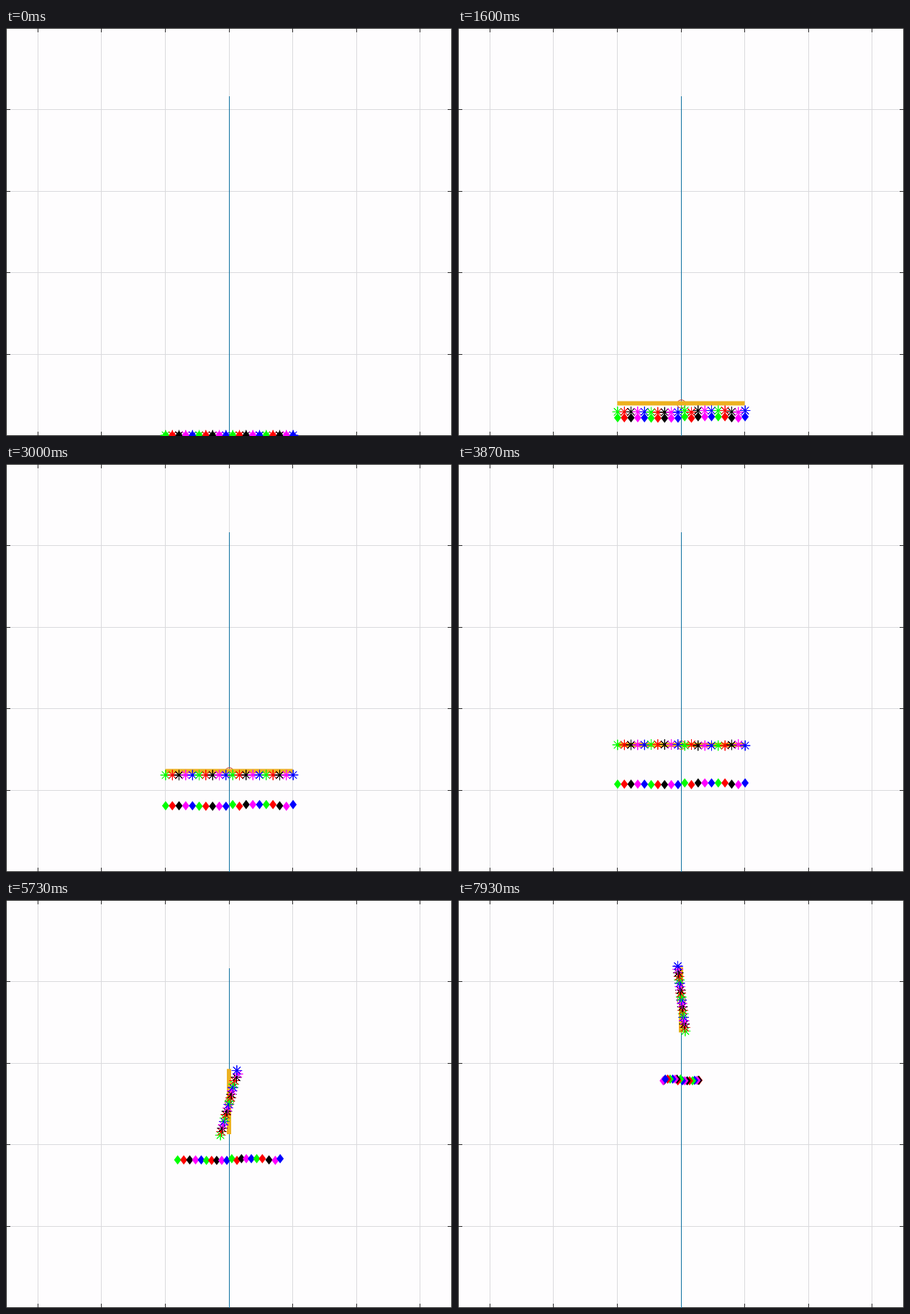
Write a matplotlib script that moves like this. It is 620 by 568 pixels and loops after 8000 ms.

```python
import numpy as np
import matplotlib.pyplot as plt
from matplotlib.animation import FuncAnimation
from matplotlib.path import Path

W, H, DPI = 620, 568, 100
PX = 72 / DPI                    # points per pixel
FRAMES, STEPS = 120, 109
CX, RX, RY = 310, 88.6, 45.4     # centre line, formation half-lengths in pixels
N = 20
idx = np.arange(N)
home = np.linspace(-1, 1, N)
colors = [("lime", "red", "black", "magenta", "blue")[i % 5] for i in idx]

# Three groups of agents respond with different damping
quick = np.isin(idx, [10, 12, 13, 14, 15, 16, 19])
lazy = np.isin(idx, [5, 6, 7, 8, 9, 11, 18])
damping = np.select([quick, lazy], [0.175, 0.135], 0.145)[:, None]

plt.rcParams["path.snap"] = False


def bar_pose(s):
    """Height and angle of the reference bar: speed up, climb, turn upright."""
    y = np.interp(s, [0, 10, 19, 40, 49, 64, 87, 108],
                  [567, 553, 522.5, 427.5, 391, 328, 219, 135])
    return np.array([y, np.clip(4.2 * (s - 52), 0, 90)])


def on_bar(u, y, angle):
    a = np.radians(angle)
    return np.column_stack([CX + RX * u * np.cos(a), y - RY * u * np.sin(a)])


def simulate():
    """Stars track the bar as damped springs; diamonds chase the bar's height
    and their star's x with a bounded pull."""
    gain, limit, drag = np.array([[.0155, .1], [.3, .47], [.08, .14]])
    pose, turn = np.tile(bar_pose(0), (N, 1)), np.zeros((N, 2))
    dia, vel = on_bar(home, *pose.T), np.zeros((N, 2))
    stars, diamonds = [], []
    for s in range(STEPS):
        star = on_bar(home, *pose.T)
        stars.append(star)
        diamonds.append(dia)
        goal = np.column_stack([star[:, 0], pose[:, 0]])
        vel = vel + np.clip(gain * (goal - dia), -limit, limit) - drag * vel
        dia = dia + vel
        now, ahead = bar_pose(s), bar_pose(s + 1)
        turn = turn + 0.01 * (now - pose) + damping * (ahead - now - turn)
        pose = pose + turn
    return stars, diamonds


def step_of(n):
    """Simulation step of a picture: it waits at the start and before turning."""
    return min(max(n - 5, 0), 48) if n < 58 else max(n - 11, 49)


stars, diamonds = simulate()

fig = plt.figure(figsize=(W / DPI, H / DPI), dpi=DPI, facecolor="#fefdfe")
ax = fig.add_axes([0, 0, 1, 1])
ax.set_xlim(0, W)
ax.set_ylim(H, 0)
ax.axis("off")

# Grid, ticks and frame
gx = np.floor(CX + RX * np.arange(-3, 4)) + 0.5
gy = np.floor(113.5 * np.arange(1, 5)) + 0.5
ax.vlines(gx, 0, H, color="#dadadd", lw=PX, zorder=0)
ax.hlines(gy, 0, W, color="#dadadd", lw=PX, zorder=0)
for a, b in ((0, 6), (H - 6, H)):
    ax.vlines(gx, a, b, color="#262626", lw=PX, zorder=1)
for a, b in ((0, 6), (W - 6, W)):
    ax.hlines(gy, a, b, color="#262626", lw=PX, zorder=1)
ax.plot([.5, W - .5, W - .5, .5, .5], [.5, .5, H - .5, H - .5, .5],
        color="#262626", lw=PX, zorder=1)

ax.vlines(CX + .5, 95, H, color="#0c709f", lw=PX, zorder=2)
ring, = ax.plot([], [], "o", ms=11.5 * PX, mfc="none", mec="#d0452a",
                mew=PX, zorder=3)
bar, = ax.plot([], [], color="#edb120", lw=6 * PX, zorder=4,
               solid_capstyle="butt")
star_dots = ax.scatter(idx, idx, s=(14 * PX) ** 2, c=colors,
                       marker=(8, 2, 0), linewidths=.75 * PX, zorder=5)
rhomb = Path([(0, 1), (.77, 0), (0, -1), (-.77, 0), (0, 1)])
dia_dots = ax.scatter(idx, idx, s=(13 * PX) ** 2, c=colors, marker=rhomb,
                      linewidths=0, zorder=6)


def draw(n):
    s = step_of(n)
    y, angle = bar_pose(s)
    ring.set_visible(s > 0)
    bar.set_visible(s > 0)
    ring.set_data([CX], [y])
    bar.set_data(*on_bar(np.array([-1, 1]), y, angle).T)
    star_dots.set_offsets(stars[s] + [.5, 0])
    dia_dots.set_offsets(diamonds[s] + [.5, 0])
    return ring, bar, star_dots, dia_dots


anim = FuncAnimation(fig, draw, frames=FRAMES, interval=8000 / FRAMES,
                     repeat=True, repeat_delay=0)
plt.show()
```
